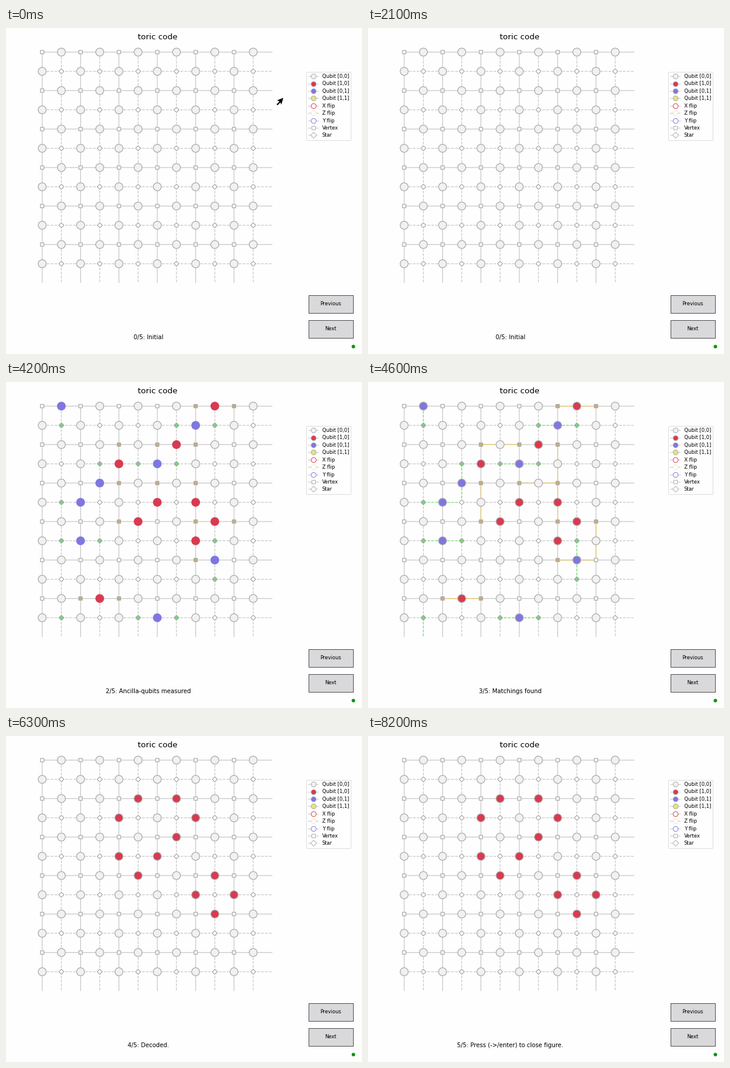
Write a matplotlib script that moves like this. It is 600 px wide and 549 px high and loops after 8.3 s.

```python
import matplotlib.pyplot as plt
from matplotlib.animation import FuncAnimation
from matplotlib.collections import LineCollection
from matplotlib.lines import Line2D
from matplotlib.patches import Circle, Polygon, Rectangle

W, H, DPI = 600, 549, 60
FRAMES, INTERVAL = 83, 100
N = 12                                  # half-cells per side of the torus
X0, Y0, DX, DY = 61.0, 40.6, 32.33, 32.4

BACK, LINE, EDGE = "#fefefe", "#c8c8ca", "#aaaaaa"
GREY, RED, BLUE, YELLOW = "#f1f0f2", "#d93a50", "#7f77e0", "#e2e47c"
TAN, GREEN = "#c8af74", "#76d676"
PATH_X, PATH_Z = "#e2c468", "#78ea78"

CAPTIONS = ["Initial", "Errors applied", "Ancilla-qubits measured",
            "Matchings found", "Decoded.",
            "Press (->/enter) to close figure."]
LAST = len(CAPTIONS) - 1
FIRST_CHANGE, STAGE_LENGTH = 23, 10.3   # in animation steps
CURSOR_GONE = 4

RED_ERRORS = {(9, 0), (7, 2), (4, 3), (6, 5), (8, 5),
              (5, 6), (9, 6), (8, 7), (3, 10)}
BLUE_ERRORS = {(1, 0), (8, 1), (6, 3), (3, 4),
               (2, 5), (2, 7), (9, 8), (6, 11)}
LOOP_STARS = [(5, 3), (7, 3), (5, 5), (9, 7)]


def around(i, j):
    return {((i + a) % N, (j + b) % N)
            for a, b in ((1, 0), (-1, 0), (0, 1), (0, -1))}


def is_defect(i, j):
    """An ancilla fires when an odd number of its qubits is flipped."""
    errors = BLUE_ERRORS if i % 2 else RED_ERRORS
    return len(around(i, j) & errors) % 2 == 1


# Decoding leaves closed loops, so errors and corrections differ by them
RESIDUE = set()
for star in LOOP_STARS:
    RESIDUE ^= around(*star)
RED_FIXES = RED_ERRORS ^ RESIDUE


def pos(i, j):
    return X0 + i * DX, Y0 + j * DY


def edges(qubits, to_stars):
    """Segments from ancillas to qubits, kept on the right side of the seam."""
    segments = []
    for i, j in qubits:
        a, b = (1, 0) if bool(i % 2) != to_stars else (0, 1)
        for s in (-1, 1):
            u, v = i + s * a, j + s * b
            du, dv = (N if u < 0 else 0), (N if v < 0 else 0)
            segments.append([pos(u + du, v + dv), pos(i + du, j + dv)])
    return segments


fig = plt.figure(figsize=(W / DPI, H / DPI), dpi=DPI, facecolor=BACK)
ax = fig.add_axes([0, 0, 1, 1])
ax.set_xlim(0, W)
ax.set_ylim(H, 0)
ax.axis("off")


def draw_edges(qubits, to_stars, color, z):
    lines = LineCollection(edges(qubits, to_stars), colors=color, lw=1.5,
                           ls="--" if to_stars else "-", zorder=z)
    lines.set_snap(False)
    return ax.add_collection(lines, autolim=False)


def draw_nodes():
    qubits, ancillas = {}, {}
    look = dict(ec=EDGE, lw=1.5, zorder=3, snap=False)
    for i in range(N):
        for j in range(N):
            x, y = pos(i, j)
            if (i + j) % 2:
                node = qubits[i, j] = Circle((x, y), 6.7, fc=GREY, **look)
            else:
                if i % 2:
                    r = 4.3
                    node = Polygon([(x - r, y), (x, y - r),
                                    (x + r, y), (x, y + r)], fc=BACK, **look)
                else:
                    r = 2.9
                    node = Rectangle((x - r, y - r), 2 * r, 2 * r,
                                     fc=BACK, **look)
                ancillas[i, j] = node
            ax.add_patch(node)
    return qubits, ancillas


def draw_legend():
    def handle(label, marker="o", face=BACK, edge=EDGE, size=10, style="-"):
        return Line2D([], [], color=LINE, ls=style, lw=1.2, marker=marker,
                      ms=size, mfc=face, mec=edge, mew=1.1, label=label)

    rows = [handle("Qubit [0,0]", face=GREY),
            handle("Qubit [1,0]", face=RED),
            handle("Qubit [0,1]", face=BLUE),
            handle("Qubit [1,1]", face=YELLOW),
            handle("X flip", edge=RED),
            handle("Z flip", edge="#ecebb4"),
            handle("Y flip", edge=BLUE),
            handle("Vertex", "s", size=8),
            handle("Star", "D", size=8, style="--")]
    ax.legend(handles=rows, loc="upper left", bbox_to_anchor=(506, 73.7),
              bbox_transform=ax.transData, borderaxespad=0, fontsize=10,
              labelspacing=0.41)


def draw_button(top, label):
    ax.add_patch(Rectangle((510, top), 75, 30, fc="#d9d8da", ec="black",
                           lw=0.8))
    ax.text(547.5, top + 17.1, label, size=10, ha="center", va="baseline")


qubits, ancillas = draw_nodes()
draw_edges(qubits, False, LINE, 1)
draw_edges(qubits, True, LINE, 1)
matchings = [draw_edges(RED_FIXES, False, PATH_X, 2),
             draw_edges(BLUE_ERRORS, True, PATH_Z, 2)]
draw_legend()
draw_button(449.5, "Previous")
draw_button(491.5, "Next")
ax.add_patch(Circle((585.5, 536.5), 3, fc="#0a960a", ec="none"))
ax.text(255, 19, "toric code", size=16, ha="center", va="baseline")
caption = ax.text(240, 524, "", size=12, ha="center", va="baseline")
cursor = ax.add_patch(Polygon(
    [(467.4, 117.6), (457, 121.8), (461, 123.7), (456, 128.6),
     (457.6, 130.2), (462.5, 125.3), (464, 129)],
    fc="black", ec="none", zorder=5))


def stage_at(frame):
    if frame < FIRST_CHANGE:
        return 0
    return min(LAST, 1 + int((frame - FIRST_CHANGE) / STAGE_LENGTH))


def update(frame):
    stage = stage_at(frame)
    caption.set_text(f"{stage}/{LAST}: {CAPTIONS[stage]}")
    cursor.set_visible(frame < CURSOR_GONE)

    flipped, decoded = 1 <= stage <= 3, stage > 3
    reds = RED_ERRORS if flipped else RESIDUE if decoded else set()
    blues = BLUE_ERRORS if flipped else set()
    for spot, node in qubits.items():
        face = RED if spot in reds else BLUE if spot in blues else GREY
        node.set_facecolor(face)
        node.set_edgecolor(EDGE if face == GREY or stage >= 3 else face)

    for spot, node in ancillas.items():
        lit = stage in (2, 3) and is_defect(*spot)
        node.set_facecolor((GREEN if spot[0] % 2 else TAN) if lit else BACK)

    for lines in matchings:
        lines.set_visible(stage == 3)
    return []


anim = FuncAnimation(fig, update, frames=FRAMES, interval=INTERVAL,
                     repeat=True)
plt.show()
```
